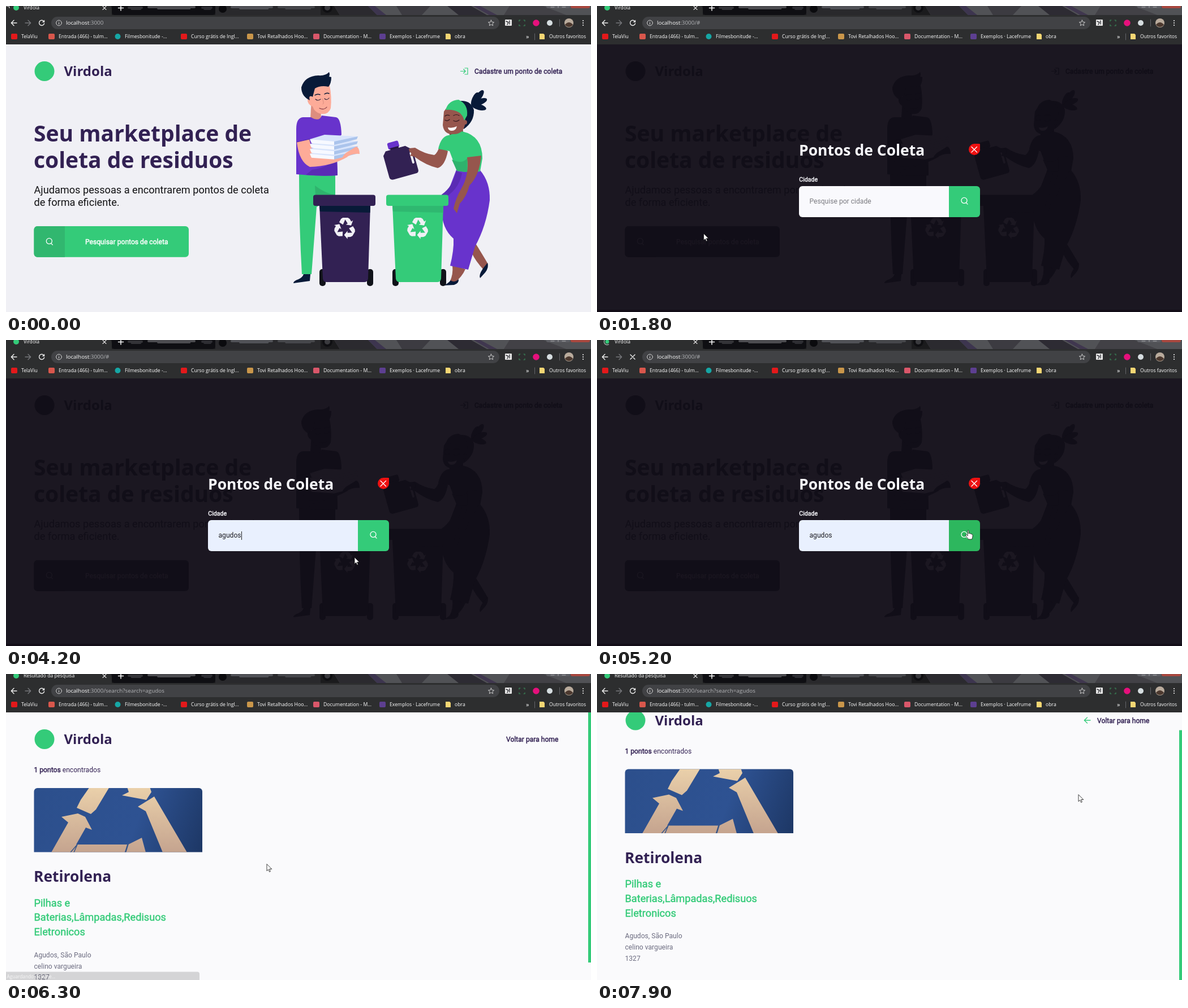
An HTML page with a canvas for the animation above (8 s loop, 1034 by 542 pixels).

```html
<!DOCTYPE html>
<html lang="pt-BR">
<head>
<meta charset="utf-8">
<title>Virdola</title>
<style>
html, body { margin: 0; width: 100%; height: 100%; overflow: hidden; background: #f0f0f5; }
canvas { display: block; width: 1034px; height: 542px; }
</style>
</head>
<body>
<canvas id="stage" width="1034" height="542"></canvas>
<script>
const g = document.getElementById('stage').getContext('2d');
const W = 1034, H = 542, LOOP = 8000, TOP = 68;
const ROBOTO = 'Roboto, sans-serif', HEAD = '"Noto Sans", sans-serif', UI = '"Open Sans", sans-serif';
const GREEN = '#34cb79', HOVER = '#2fb86e', PLUM = '#322153', VIOLET = '#6833cc';
const NAVY = '#081a38', SKIN = '#fdab98', BROWN = '#96564d', BAR = '#2d2e2f';
const PAGE = '#f0f0f5', WHITE = '#ffffff', PAPER = ['#d8e4fb', '#f7f9ff', '#abc4ec'];

// ---- helpers
// Behind the modal the page shrinks to two dark tones.
let dimmed = false;
const PALE = [PAGE, WHITE, ...PAPER];
const ink = c => !dimmed ? c : PALE.includes(c) ? '#1b1721' : '#110e18';

function rect(x, y, w, h, color, r = 0) {
  g.fillStyle = ink(color);
  g.beginPath();
  g.roundRect(x, y, w, h, r);
  g.fill();
}
function disc(x, y, r, color) {
  g.fillStyle = ink(color);
  g.beginPath();
  g.arc(x, y, r, 0, 7);
  g.fill();
}
function fill(d, color) {
  g.fillStyle = ink(color);
  g.fill(new Path2D(d));
}
function line(d, color, width = 1) {
  g.strokeStyle = ink(color);
  g.lineWidth = width;
  g.lineCap = g.lineJoin = 'round';
  g.stroke(new Path2D(d));
}
function text(s, x, y, size, family, color, heavy) {
  g.font = (heavy === 'bold' ? 'bold ' : '') + size + 'px ' + family;
  g.fillStyle = g.strokeStyle = ink(color);
  g.fillText(s, x, y);
  if (heavy === 'faux') {
    g.lineWidth = 0.45;
    g.strokeText(s, x, y);
  }
}
function at(x, y, draw, angle = 0, scale = 1) {
  g.save();
  g.translate(x, y);
  g.rotate(angle);
  g.scale(scale, scale);
  draw();
  g.restore();
}
const clamp = v => Math.max(0, Math.min(1, v));
const ease = v => v * v * (3 - 2 * v);
const between = (t, a, b) => t >= a && t < b;

function mix(a, b, k) {
  const part = (c, i) => parseInt(c.slice(i, i + 2), 16);
  return 'rgb(' + [1, 3, 5].map(i => Math.round(part(a, i) + (part(b, i) - part(a, i)) * k)) + ')';
}

// ---- pointer: time, x, y
const PATH = [
  [200, 1, -9], [500, 84, 117], [600, 84, 117], [1500, 163, 410], [1700, 163, 410],
  [2200, 409, 345], [2300, 409, 345], [2500, 415, 346], [2800, 415, 346],
  [3100, 407, 417], [3200, 407, 417], [3400, 412, 424], [4000, 412, 424],
  [4200, 616, 385], [4300, 616, 385], [4700, 659, 338], [4800, 659, 338], [4900, 655, 337],
  [6200, 655, 337], [6300, 461, 337], [7000, 461, 337], [7600, 851, 214]
];
function pointer(t) {
  if (t <= PATH[0][0]) return PATH[0].slice(1);
  for (let i = 1; i < PATH.length; i++) {
    const [t0, x0, y0] = PATH[i - 1], [t1, x1, y1] = PATH[i];
    if (t <= t1) {
      const k = ease((t - t0) / (t1 - t0));
      return [x0 + (x1 - x0) * k, y0 + (y1 - y0) * k];
    }
  }
  return PATH[PATH.length - 1].slice(1);
}
function drawPointer(kind, x, y) {
  at(x, y, () => {
    if (kind === 'beam') {
      line('M-2,-5H2M0,-5V5M-2,5H2', 'rgba(90,90,90,.45)', 0.7);
      return;
    }
    const d = kind === 'hand'
      ? 'M0,1C0,-.4 2,-.4 2,1V6L3,5.5C4,5 4.8,5.5 5,6.4C6,5.8 7,6.3 7.2,7.2C8.4,6.8 9,7.6 9,8.6V11C9,13 8,14 7.6,16H1.2C.6,13.5 -2,11.6 -3.6,9C-3.8,7.4 -2,7.2 -1,8.6L0,9.6Z'
      : 'M0,0V11.8L2.7,9.2L4.6,13.5L6.4,12.7L4.6,8.5H8.4Z';
    fill(d, WHITE);
    line(d, '#111', 0.8);
  });
}

// ---- browser frame
function smudge(x, y, w, color) {
  rect(x, y, w, 4, color, 2);
  rect(x + w * 0.2, y + 2, w * 0.7, 4, color, 2);
}
function tabStrip(t, title, loading) {
  rect(0, 0, W, 17, '#1b1b1d');
  rect(187, 0, 183, 16, '#0f0f13', [0, 0, 5, 5]);
  rect(370, 0, 186, 16, '#29292c');
  smudge(215, 1, 27, '#343438');
  smudge(250, 0, 85, '#4c4c50');
  smudge(345, 1, 20, '#2e2e33');
  disc(383, 5, 7, '#0b0b0e');
  smudge(397, 0, 75, '#515257');
  smudge(480, 0, 66, '#46474b');
  fill('M580,0H1034V16H590Z', '#515256');
  fill('M580,0H640L656,16H590Z', '#2b2a2f');
  fill('M640,0H652L672,16H656Z', '#3d354f');
  fill('M690,0H750L735,16H700Z', '#3c3b41');
  fill('M780,0H822L850,16H800Z', '#2d2b33');
  fill('M826,0H838L868,16H854Z', '#40374f');
  fill('M890,0H950L990,16H880Z', '#424146');
  disc(568, 3, 9, '#0f0f12');
  disc(568, 3, 5, '#3a3a3e');
  rect(955, -4, 42, 8, '#5d5e64', 3);
  rect(998, -4, 34, 8, '#a8483f', 3);
  line('M976,0V3M963,2H969M983,2H989', '#bbb', 0.8);
  fill('M0,0H183Q187,0 187,6V17H0Z', BAR);
  disc(18, 3, loading ? 3.4 : 5, GREEN);
  if (loading) {
    at(18, 3, () => line('M5.5,0A5.5,5.5 0 0 1 -5.5,0', '#9fb7ab', 1.3), t / 160);
  }
  text(title, 31, 6.2, 8.6, UI, WHITE);
  line('M171,0.5L177,6.5M177,0.5L171,6.5', '#e0e0e0', 1.1);
  line('M198.5,3.5H207.5M203,-1V8', WHITE, 1.5);
}
function bookmark(x, label, color, round) {
  if (round) disc(x + 5.5, 54, 5, color);
  else rect(x, 49, 11, 10, color, 2);
  text(label, x + 18, 57.3, 8.7, UI, WHITE);
}
function folder(x) {
  fill(`M${x},49H${x + 7}L${x + 9},51V59H${x}Z`, '#f4d673');
}
function browser(t, title, path, loading) {
  tabStrip(t, title, loading);
  rect(0, 16, W, TOP - 16, BAR);
  line('M19,30H9.5M14,25.3L9.3,30L14,34.7', '#f1f1f1', 1.4);
  line('M34,30H43.5M39,25.3L43.7,30L39,34.7', '#77787c', 1.3);
  if (loading) line('M59,26L67,34M67,26L59,34', '#f1f1f1', 1.4);
  else {
    line('M67,27.4A4.6,4.6 0 1 0 67.6,31', '#f1f1f1', 1.4);
    fill('M68.2,24.6V29H63.8Z', '#f1f1f1');
  }
  rect(80, 19, 792, 22, '#414245', 11);
  line('M98.3,30a4.8,4.8 0 1 0 -9.6,0a4.8,4.8 0 1 0 9.6,0', '#d8d8d8', 1);
  line('M93.5,29.5V32.4M93.5,27.5V27.6', '#d8d8d8', 1);
  text('localhost', 106, 33.4, 9.85, UI, WHITE);
  text(path, 106 + g.measureText('localhost').width, 33.4, 9.85, UI, '#b4b5b8');
  line('M857.5,25L859,28.4L862.6,28.8L859.9,31.2L860.7,34.7L857.5,32.9L854.3,34.7L855.1,31.2L852.4,28.8L856,28.4Z', '#d8d8d8', 0.9);
  rect(882, 24, 12, 11, '#e6e6e6', 1);
  line('M884,27L888,29L886,33M890,26V32', '#34353a', 1.4);
  line('M907,27V25H909M915,25H917V27M917,33V35H915M909,35H907V33', '#3a8a5a', 1.2);
  disc(937, 30, 5.8, '#e6107c');
  disc(961, 30, 5, '#d6dde0');
  line('M978.5,24V36', '#64656a', 1);
  disc(995, 30, 8, '#b9ab9c');
  fill('M988,33Q995,25 1002,33A8,8 0 0 1 988,33', '#4c392f');
  for (const y of [26, 30, 34]) disc(1020, y, 1.1, '#f0f0f0');
  bookmark(9, 'TelaViu', '#e3191b');
  bookmark(75, 'Entrada (466) - tulm...', '#d8574c');
  bookmark(192, 'Filmesbonitude -...', '#16a7a5', true);
  bookmark(309, 'Curso grátis de Ingl...', '#e3191b');
  bookmark(426, 'Tovi Retalhados Hoo...', '#c9964a');
  bookmark(543, 'Documentation - M...', '#d9576a');
  bookmark(660, 'Exemplos · Lacefrume', '#5d3f91');
  folder(777);
  text('obra', 793, 57.3, 8.7, UI, WHITE);
  text('»', 919, 57.5, 11, UI, WHITE);
  line('M934.5,49V60', '#64656a', 1);
  folder(943);
  text('Outros favoritos', 960, 57.3, 8.6, UI, WHITE);
}

// ---- shared page parts
function brand(y) {
  disc(68, y, 17.5, GREEN);
  text('Virdola', 102.5, y + 8.6, 24, HEAD, PLUM, 'bold');
}
function lens(x, y, color) {
  line(`M${x + 3.6},${y + 3.6}L${x + 6},${y + 6}M${x + 5},${y - 0.6}a5,5 0 1 0 -10,0a5,5 0 1 0 10,0`, color, 1.3);
}
function recycle(x, y) {
  for (let i = 0; i < 3; i++) {
    at(x, y, () => fill('M-9.5,-10L-6.5,-15.5L-3.5,-17.5H5L8,-15.5L10.6,-11.2L13.5,-12.9L10.4,-4.5L1.6,-6L4.6,-7.7L.5,-14.3L-3.2,-6Z', PAGE),
      i * Math.PI * 2 / 3, 1.06);
  }
}

// ---- illustration
function man() {
  fill('M518,298H582V334L549,356L540,475H523Q518,390 518,298Z', GREEN);
  fill('M546,318Q566,333 582,334V340L548,352Z', '#2fb36d');
  fill('M526,475H538L537,487L508,491Q508,487 517,484Q524,481 526,475Z', NAVY);
  fill('M540,164H555L557,198Q550,206 538,200Z', '#dd8d7f');
  fill('M525,197Q513,198 513,218V298Q550,302 586,300L584,238L593,228Q592,198 583,197L558,194Q554,206 539,197Z', VIOLET);
  fill('M541,290Q570,286 585,268L586,300Q560,302 530,299Z', '#5a2bb4');
  fill('M540,144Q560,140 572,141Q576,160 574,181Q570,193 556,191Q545,188 542,178Q532,174 533,164Q536,158 541,161Z', SKIN);
  fill('M537,167Q522,160 522,144Q528,124 552,123Q565,124 571,117Q573,121 571,125L575,126Q575,137 570,143Q556,140 546,146L542,161Q534,157 537,167Z', NAVY);
  line('M547,165Q551,169 556,165M563,164Q567,168 571,163', '#33243b', 1.1);
  line('M546,158Q550,155 555,157M563,156Q567,153 571,155', NAVY, 1.4);
  line('M559,164Q563,173 560,174', '#d98d7f', 1);
  line('M554,181Q562,185 567,179', '#7d3440', 1.1);
  fill('M514,241L536,236L543,263Q575,271 598,261L604,267Q575,284 537,285Q518,276 514,241Z', SKIN);
  line('M514,241L536,236', '#5529aa', 1.2);
  for (let i = 3; i >= 0; i--) {
    const y = 236 + i * 8.6;
    fill(`M537,${y}L563,${y - 8}L622,${y - 5}L580,${y + 8}Z`, PAPER[0]);
    fill(`M537,${y}L580,${y + 4}V${y + 10}L540,${y + 7}Z`, PAPER[1]);
    fill(`M580,${y + 4}L622,${y - 5}L620,${y}L580,${y + 10}Z`, PAPER[2]);
  }
  fill('M598,270Q591,269 601,260L619,249Q625,251 625,262Q612,260 598,270Z', SKIN);
}
function woman() {
  for (const [x, y, a] of [[829, 165, -1.15], [836, 160, -0.95], [838, 170, -0.4], [836, 179, 0.25]]) {
    g.fillStyle = ink(NAVY);
    g.beginPath();
    g.ellipse(x, y, 13, 5.2, a, 0, 7);
    g.fill();
  }
  fill('M803,168Q822,167 827,184Q828,205 809,218Z', NAVY);
  fill('M829,419Q842,440 852,457L844,467Q830,452 823,437Z', BROWN);
  fill('M843,465L851,455Q854,463 847,472L838,482Q835,477 843,465Z', NAVY);
  fill('M789,459L812,466Q806,480 792,491L784,489Q791,476 789,459Z', BROWN);
  fill('M772,495Q780,493 786,486Q792,491 800,484Q801,491 792,494Z', NAVY);
  fill('M796,290L838,291Q856,312 855,344Q849,390 829,426L817,467L785,460Q792,432 791,412Q770,394 770,360Q782,326 796,290Z', VIOLET);
  fill('M796,292Q790,320 770,334V342Q800,328 806,296Z', '#5a2bb4');
  fill('M781,214H807L809,232L786,237Z', '#7e443e');
  fill('M766,249L781,257Q776,283 763,287Q742,282 722,267L713,264V252L723,251Q740,262 757,264Q763,260 766,249Z', BROWN);
  fill('M764,253Q769,231 782,229L806,222Q842,230 842,270L838,293Q818,296 797,292L784,257Z', GREEN);
  fill('M788,272Q806,281 815,270V294L797,292Z', '#2fb36d');
  fill('M815,268L840,265Q837,300 819,318Q814,338 802,350L797,367L791,359Q795,340 805,323Q819,299 815,268Z', BROWN);
  fill('M774,187Q782,172 799,176Q812,188 812,205Q810,228 789,227Q774,227 772,211Z', BROWN);
  disc(811, 206, 4, BROWN);
  fill('M777,184Q782,167 800,166Q817,174 815,194L810,203Q805,182 777,184Z', GREEN);
  line('M776,202Q780,205 784,201M791,203Q796,206 801,202', '#32191f', 1.2);
  line('M776,195Q779,192 784,194M791,194Q796,191 801,194', '#32191f', 1.2);
  fill('M781,215Q789,217 797,213Q795,221 788,221Q782,221 781,215Z', WHITE);
}
function bin(x, body, stripe) {
  rect(x + 11, 466, 11, 30, '#11131a', 5);
  rect(x + 95, 466, 11, 30, '#11131a', 5);
  fill(`M${x + 11},352H${x + 101}L${x + 97},483Q${x + 96},489 ${x + 90},489H${x + 24}Q${x + 18},489 ${x + 17},483Z`, body);
  fill(`M${x + 11},354H${x + 101}L${x + 100.5},366L${x + 12},364Z`, stripe);
  rect(x, 334.5, 110, 19.5, body, 4);
  recycle(x + 56, 393.5);
}
function jug() {
  at(697, 273, () => {
    rect(-15, -35, 20, 12, VIOLET, 3);
    rect(-12, -25, 15, 6, '#261743');
    fill('M-21,-22H15L26,-12V25Q26,30 20,30H-20Q-27,30 -27,24V-15Z', PLUM);
    line('M21,-7V10', PAGE, 4);
  }, -0.27);
  fill('M712,253Q721,250 724,256L722,267L714,265Q719,261 713,258Z', BROWN);
}

// ---- pages
function home(hover) {
  rect(0, TOP, W, H - TOP, PAGE);
  brand(115.5);
  line('M803.5,115.5H812M808.7,112L812.2,115.5L808.7,119M811,110H816V121H811', GREEN, 1.2);
  text('Cadastre um ponto de coleta', 828, 119.5, 12.11, ROBOTO, PLUM, 'faux');
  text('Seu marketplace de', 49, 240, 39, HEAD, PLUM, 'bold');
  text('coleta de residuos', 49, 287, 39, HEAD, PLUM, 'bold');
  text('Ajudamos pessoas a encontrarem pontos de coleta', 49.5, 331.5, 18.17, ROBOTO, '#121214');
  text('de forma eficiente.', 49.5, 354, 18.17, ROBOTO, '#121214');
  rect(49.5, 390, 273.5, 54.7, mix(GREEN, HOVER, hover), 6);
  rect(49.5, 390, 54.5, 54.7, mix('#31b76f', HOVER, hover), [6, 0, 0, 6]);
  lens(76.3, 417, WHITE);
  text('Pesquisar pontos de coleta', 140, 422.3, 12.11, ROBOTO, WHITE, 'faux');
  man();
  woman();
  bin(543, PLUM, NAVY);
  bin(672, GREEN, '#2fb870');
  jug();
}

function modal(t, y) {
  rect(0, 538, W, 4, 'rgba(8,2,10,.4)');
  text('Pontos de Coleta', 357, 264.8, 26.5, HEAD, '#f8f8fc', 'bold');
  rect(657, 244, 20, 20, '#ee1111', [10, 1, 10, 10]);
  line('M662,249.5L671.5,259M671.5,249.5L662,259', WHITE, 1.4);
  text('Cidade', 357.3, 310.5, 10.6, ROBOTO, '#f8f8fc', 'faux');

  const open = between(t, 2700, 4100);
  const row = open && t >= 2900 && y > 381 ? Math.min(2, Math.floor((y - 381) / 27.5)) : -1;
  const cities = ['sao joao', 'agudos', 'brasilia'];
  const value = t >= 4100 ? 'agudos' : row >= 0 ? cities[row] : '';
  rect(357, 319, 265, 55, value ? '#e9f0fe' : '#f9f9fd', [6, 0, 0, 6]);
  text(value || 'Pesquise por cidade', 375.5, 350.3, 12.11, ROBOTO, value ? '#1d1d22' : '#7b7b80');
  if (between(t, 2700, 3800)) rect(375, 339, 1, 15, '#444');
  if (between(t, 4100, 4700)) rect(416, 339, 1, 15, '#222');
  rect(622, 319, 55, 55, mix(GREEN, '#2db75e', clamp((t - 4500) / 200)), [0, 6, 6, 0]);
  lens(649, 345, WHITE);
  if (open) {
    rect(357, 375, 265, 94, '#fafafe', 2.5);
    if (row >= 0) rect(357, 381 + row * 27.5, 265, 27.5, '#e3e4e9');
    cities.forEach((c, i) => text(c, 366, 398.3 + i * 27.4, 9.7, UI, '#202024'));
  }
}

function photo(y) {
  g.save();
  g.beginPath();
  g.roundRect(49.5, y, 297.5, 113.5, [6, 6, 0, 0]);
  g.clip();
  g.translate(0, y - 202);
  const blue = g.createLinearGradient(50, 202, 347, 315);
  blue.addColorStop(0, '#2c4f8c');
  blue.addColorStop(0.6, '#2e5292');
  blue.addColorStop(1, '#1d3765');
  rect(49, 200, 300, 118, blue);
  const sand = g.createLinearGradient(0, 202, 0, 315);
  sand.addColorStop(0, '#ead0aa');
  sand.addColorStop(1, '#c5a48f');
  fill('M148,200H183L159,240L150,248L125,237L132,223Z', sand);
  fill('M214,200H254L257,209L248,223L205,215L217,209Z', sand);
  fill('M233,235L262,217L320,316H277L247,243Z', sand);
  fill('M98,253L127,247L140,253L152,276L141,272L124,302H216L240,290L247,316H80L110,263Z', sand);
  line('M120,316L126,302L114,316', '#345489', 1.5);
  line('M216,300L211,316', '#345489', 2.5);
  g.restore();
}
function results(t) {
  const s = 33.5 * ease(clamp((t - 7000) / 600));
  rect(0, TOP, W, H - TOP, '#fafafc');
  g.save();
  g.beginPath();
  g.rect(0, TOP, W, H - TOP);
  g.clip();
  g.translate(0, -s);
  brand(115.5);
  if (t >= 7100) line('M872,115.5H861.5M866.5,110.5L861.3,115.5L866.5,120.5', GREEN, 1.3);
  text('Voltar para home', 884, 120.3, 12.11, ROBOTO, PLUM, 'faux');
  text('1 pontos', 49.5, 174.3, 12.11, ROBOTO, PLUM, 'faux');
  text(' encontrados', 49.5 + g.measureText('1 pontos').width, 174.3, 12.11, ROBOTO, PLUM);
  photo(202);
  text('Retirolena', 49, 368.3, 26.4, HEAD, PLUM, 'bold');
  ['Pilhas e', 'Baterias,Lâmpadas,Redisuos', 'Eletronicos'].forEach((r, i) =>
    text(r, 49.5, 411.5 + i * 25.9, 18.17, ROBOTO, GREEN, 'faux'));
  ['Agudos, São Paulo', 'celino vargueira', '1327'].forEach((r, i) =>
    text(r, 49.5, 501.7 + i * 19.8, 12.11, ROBOTO, '#6c6c80'));
  g.restore();
  rect(1029, TOP + s * 0.94, 5, 443, GREEN);
}

function status(label, width, alpha) {
  g.globalAlpha = alpha;
  rect(0, 527.5, width, 15, '#0e0d11', [0, 4, 0, 0]);
  g.globalAlpha = alpha < 1 ? 0.8 : 1;
  text(label, 1.5, 538.7, 8.3, UI, WHITE);
  g.globalAlpha = 1;
}

function draw(t) {
  const [x, y] = pointer(t);
  const showModal = between(t, 1800, 6300);
  if (t >= 6300) results(t);
  else {
    dimmed = showModal;
    home(clamp((t - 1300) / 200));
    dimmed = false;
  }
  if (showModal) modal(t, y);
  if (between(t, 1500, 1800)) status('localhost:3000/#', 73, 1);
  if (between(t, 5700, 6300)) status('Aguardando o cache...', 343, 1);
  if (between(t, 6300, 6800)) status('Aguardando o cache...', 342, 0.16);

  const loaded = t >= 5700;
  const path = loaded ? ':3000/search?search=agudos' : t >= 1600 ? ':3000/#' : ':3000';
  browser(t, loaded ? 'Resultado da pesquisa' : 'Virdola', path, between(t, 4600, 6300));

  const onInput = showModal && x > 357 && x < 622 && y > 319 && y < 374;
  const onButton = showModal && x >= 622 && y < 374;
  drawPointer(onInput ? 'beam' : onButton ? 'hand' : 'arrow', x, y);
}

const start = performance.now();
function tick(now) {
  const t = Math.max(0, now - start) % LOOP;
  draw(Math.floor(t / 100) * 100); // the screen advances ten times a second
  requestAnimationFrame(tick);
}
draw(0);
requestAnimationFrame(tick);
</script>
</body>
</html>
```
